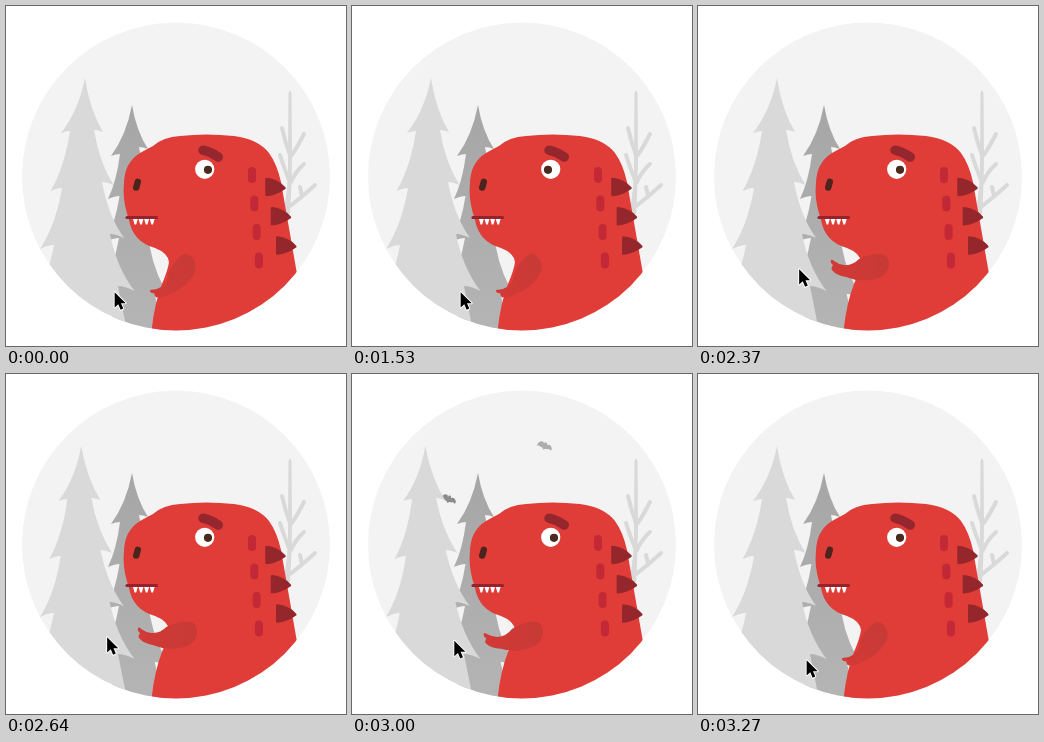
These frames come from a looping animation (340x340 px, 3540 ms). An HTML page with a canvas:

```html
<!DOCTYPE html>
<html lang="en">
<head>
<meta charset="utf-8">
<title>Dinosaur shaking a tree</title>
<style>
  html, body { margin: 0; width: 100%; height: 100%; overflow: hidden; background: #fff; }
  canvas { display: block; width: 340px; height: 340px; }
</style>
</head>
<body>
<canvas></canvas>
<script>
const LOOP = 3540, STEP = 30, SIZE = 340;
const canvas = document.querySelector('canvas');
const ctx = canvas.getContext('2d');
const ratio = window.devicePixelRatio || 1;
canvas.width = canvas.height = SIZE * ratio;

const lerp = (a, b, u) => a + (b - a) * u;
const progress = (t, from, to) => Math.min(1, Math.max(0, (t - from) / (to - from)));
const smooth = u => u * u * (3 - 2 * u);
const easeOut = u => 1 - (1 - u) ** 2;
const ease = (t, from, to) => smooth(progress(t, from, to));

function fillPath(d, color) {
  ctx.fillStyle = color;
  ctx.fill(new Path2D(d));
}

function strokePath(d, color, width) {
  ctx.strokeStyle = color;
  ctx.lineWidth = width;
  ctx.lineCap = ctx.lineJoin = 'round';
  ctx.stroke(new Path2D(d));
}

function disc(x, y, radius, color) {
  ctx.beginPath();
  ctx.arc(x, y, radius, 0, Math.PI * 2);
  ctx.fillStyle = color;
  ctx.fill();
}

function placed(x, y, angle, scale, draw) {
  ctx.save();
  ctx.translate(x, y);
  ctx.rotate(angle);
  ctx.scale(scale, scale);
  draw();
  ctx.restore();
}

// Each side is a stack of drooping tiers that widen evenly towards the ground.
function drawFir({ x, y, color, left, right, lean = 0 }) {
  const pivot = 245;
  const bend = (px, py) => [px - lean * Math.max(0, pivot - py), py];
  ctx.beginPath();
  for (const [dir, side] of [[-1, left], [1, right]]) {
    let px = x, py = y;
    ctx.moveTo(...bend(x, y));
    for (let i = 0; i < 4; i++) {
      const tipX = x + dir * (side.spread + side.widen * i);
      const tipY = side.top + side.drop * i;
      const inset = 9 + 2.5 * i;
      ctx.quadraticCurveTo(...bend(lerp(px, tipX, 0.28), lerp(py, tipY, 0.6)), ...bend(tipX, tipY));
      px = tipX - dir * inset;
      py = tipY - 2 - i;
      ctx.quadraticCurveTo(...bend(lerp(tipX, px, 0.6), py), ...bend(px, py));
    }
    ctx.lineTo(px + dir * 10, 330);
    ctx.lineTo(x, 330);
    ctx.closePath();
  }
  ctx.fillStyle = color;
  ctx.fill();
}

function drawBareTree() {
  const gray = '#d9d9d9';
  fillPath('M282.5 87Q284 82 285.5 87L286 150Q286 180 284 208H277Q283 180 282 150Z', gray);
  strokePath('M276 122Q279 136 284 149M274 149Q278 162 283 174M298 128Q292 140 286 149' +
    'M298 158Q290 165 285 176M309 179Q296 191 279 204M296 190L294 181', gray, 4);
}

function drawForest(lean, t) {
  const shade = ctx.createLinearGradient(0, 100, 0, 320);
  shade.addColorStop(0, '#a6a6a6');
  shade.addColorStop(1, '#b4b4b4');
  drawFir({
    x: 126, y: 99, color: shade,
    left: { spread: 21, widen: 3, top: 150, drop: 43 },
    right: { spread: 16, widen: 7.7, top: 143, drop: 50 }
  });
  drawBat(t, 2640, 600, 1, [80, 120], [148, 25], [214, 88]);
  drawBat(t, 2985, 285, 0.85, [88, 138], [130, 70], [195, 95]);
  drawFir({
    x: 79, y: 72, color: '#d9d9d9', lean,
    left: { spread: 24, widen: 10.5, top: 127, drop: 58 },
    right: { spread: 18, widen: 10.5, top: 126, drop: 53 }
  });
}

function drawBat(t, start, life, size, from, via, to) {
  const s = (t - start) / life;
  if (s <= 0 || s >= 1) return;
  const u = easeOut(s);
  const along = i => lerp(lerp(from[i], via[i], u), lerp(via[i], to[i], u), u);
  ctx.globalAlpha = 1 - smooth(progress(s, 0.35, 1));
  placed(along(0), along(1), 0.35, size * lerp(1, 0.8, u), () => fillPath(
    'M-9 0Q-7 -5 -3 -4L-2 -2L-1 -5L0 -3.5L1 -5L2 -2Q6 -5 9 0L9 3Q6 1 4 3Q2 2 0 5Q-2 2 -4 3Q-6 1 -9 3Z',
    '#8b8b8b'));
  ctx.globalAlpha = 1;
}

function drawBack() {
  const spike = 'M0 -8Q11 -7 18 1Q10 7 0 8Z';
  for (let i = 0; i < 3; i++) {
    placed(260.5 + 5.4 * i, 181 + 29.3 * i, 0, 1, () => {
      fillPath(spike, '#94262c');
      strokePath(spike, '#94262c', 2.5);
    });
  }
  for (let i = 0; i < 4; i++) {
    strokePath(`M${246 + 2.3 * i} ${165 + 28.5 * i}v8`, '#c32836', 8);
  }
}

function drawFace(pupilX) {
  strokePath('M131.8 175.8L130.2 181.6', '#4c241d', 6.4);
  for (let i = 0; i < 4; i++) {
    fillPath(`M${126.7 + 5.6 * i} 212h5.4l-1.9 6.5h-1.6Z`, '#fff');
  }
  strokePath('M121 211.5H150.5', '#93242d', 3.2);
  strokePath('M197 144.2Q205 146 212.3 151', '#96262d', 9.5);
  disc(198.7, 163.3, 9.6, '#fff');
  disc(pupilX, 163.8, 4.1, '#4b2a20');
}

function drawBody() {
  fillPath('M145 330Q148 298 156 278Q162 264 163 256Q162 247 149 242Q127 236 123 214' +
    'Q116 193 118 178Q118 157 134 147Q141 143 147 140Q157 131 174 130Q200 127 228 130' +
    'Q252 133 263 147Q271 158 275 176L291 268L292 330Z', '#e03d38');
}

function drawArm(raise, push) {
  const angle = lerp(-0.73, 0, raise);
  const reach = lerp(0.93, 1, raise) + 0.05 * push;
  placed(180, 260, angle, reach, () => {
    const shade = ctx.createLinearGradient(-48, 0, 10, 0);
    shade.addColorStop(0, '#d23a36');
    shade.addColorStop(1, '#c73a36');
    fillPath('M-47 -6Q-46 -7 -44 -5Q-40 -2 -34 -1Q-26 0 -19 -7Q-10 -12 2 -12Q11 -12 11 -2' +
      'Q10 12 -8 14Q-20 16 -32 11Q-42 9 -45 5Q-48 3 -45 -1Q-48 -3 -47 -6Z', shade);
  });
}

function drawCursor(x, y) {
  const arrow = 'M.7 .7V17.3L4.6 13.8L7.1 19.7L10 18.4L7.5 12.6H12.6Z';
  placed(x, y, 0, 0.93, () => {
    strokePath(arrow, '#fff', 2);
    fillPath(arrow, '#000');
  });
}

function render(t) {
  const raise = ease(t, 2130, 2370) - ease(t, 2910, 3270);
  const push = ease(t, 2550, 2760) - ease(t, 2790, 3270);
  const glance = progress(t, 720, 840) - progress(t, 1500, 1620);

  ctx.setTransform(ratio, 0, 0, ratio, 0, 0);
  ctx.fillStyle = '#fff';
  ctx.fillRect(0, 0, SIZE, SIZE);
  ctx.save();
  ctx.beginPath();
  ctx.arc(170, 170.5, 154, 0, Math.PI * 2);
  ctx.clip();
  ctx.fillStyle = '#f3f3f3';
  ctx.fillRect(0, 0, SIZE, SIZE);
  drawBareTree();
  drawForest(push * 0.056, t);
  drawBody();
  drawBack();
  drawFace(lerp(202, 194, glance));
  drawArm(raise, push);
  ctx.restore();
  drawCursor(lerp(108, 100.5, raise), lerp(285.5, 262.5, raise));
}

const start = performance.now();
function tick() {
  const t = (performance.now() - start) % LOOP;
  render(Math.floor(t / STEP) * STEP);
  requestAnimationFrame(tick);
}
tick();
</script>
</body>
</html>
```
